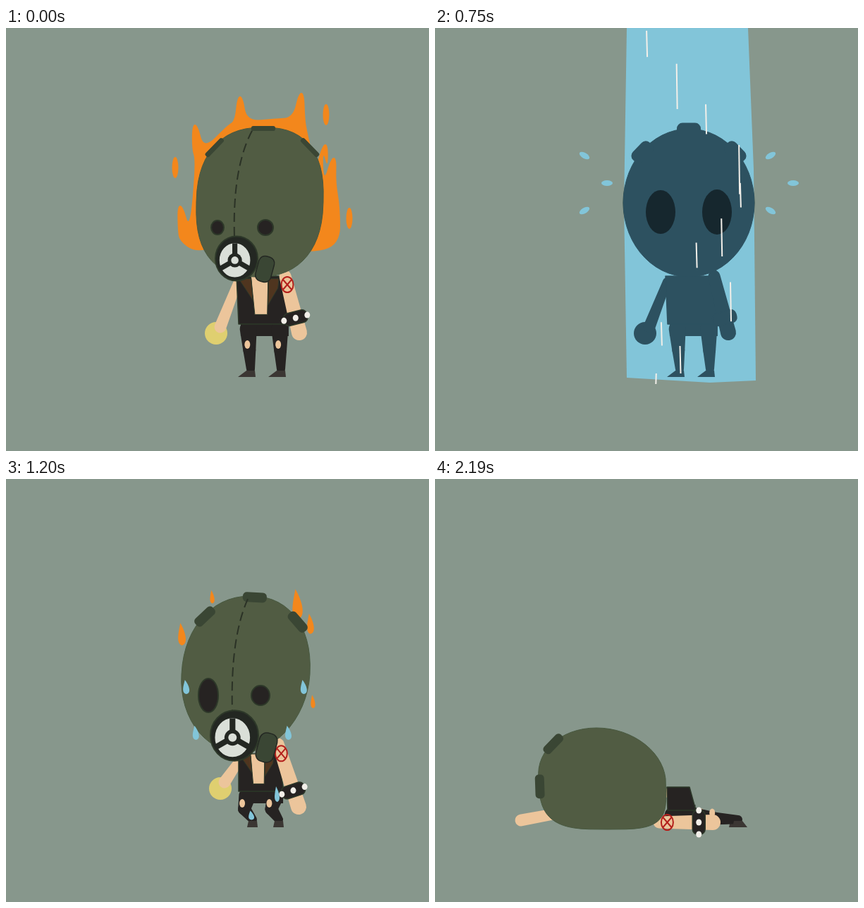
Animation, 600 px wide and 600 px high, one loop 2.52 s. Source, as an HTML page with a canvas:

```html
<!DOCTYPE html>
<html lang="en">
<head>
<meta charset="utf-8">
<title>Hot head</title>
<style>
html, body { margin: 0; width: 100%; height: 100%; overflow: hidden; background: #87978c; }
canvas { display: block; width: 600px; height: 600px; }
</style>
</head>
<body>
<canvas id="stage" width="600" height="600"></canvas>
<script>
const ctx = document.getElementById('stage').getContext('2d');
const LOOP = 2520, TAU = Math.PI * 2, RAD = TAU / 360;
const BG = '#87978c', FIRE = '#f3871c', OLIVE = '#515c43', KNOB = '#3a4634', EDGE = '#2d3829',
  BLACK = '#262322', SKIN = '#ecc59b', BROWN = '#4f351f', BALL = '#dfcf70', PALE = '#dadfd8',
  RED = '#b3201c', WATER = '#82c5d9', SHADE = '#2d5160', DEEP = '#16272e', BOOT = '#3b3633',
  RUBBER = '#232722', WHITE = '#f2efe9';

// head: x, y, rx, ry, lean, roundness above and below, turn, knob height
// mask: x, y, r, seam start; eyes: y, then x, rx, ry for each
// neck, waist: x, y, half width; grip: ball hand; arm: shoulder to hand
// feet: two points, toe, knee bend; mood: ember heat, wetness, drip angle
const stand = {
  head: [360, 247, 90, 106, -5, 0.82, 0.82, 0, 7], mask: [327, 327, 30, 349],
  eyes: [283, 300, 9, 10, 368, 11, 11],
  neck: [361, 352, 34], waist: [366, 420, 36], grip: [304, 424], arm: [396, 352, 416, 432],
  feet: [347, 487, 390, 487, -10, 0], mood: [0, 0, -45]
};
const soak = { ...stand, head: [360, 248, 93, 105, 0, 1, 1, 0, 20], eyes: [261, 320, 21, 31, 400, 21, 32] };
const drench = {
  head: [358, 251, 94, 105, 0, 1, 1, 0, 16], mask: [357, 339, 32, 357],
  eyes: [287, 313, 23, 30, 396, 14, 14],
  neck: [361, 362, 36], waist: [361, 426, 42], grip: [306, 423], arm: [405, 374, 436, 418],
  feet: [346, 486, 391, 486, 0, 0], mood: [1, 1, -45]
};
const slump = {
  head: [340, 277, 91, 111, -7, 0.92, 1, 3, 14], mask: [324, 364, 34, 343],
  eyes: [307, 287, 14, 24, 361, 13, 14],
  neck: [358, 390, 28], waist: [362, 443, 32], grip: [310, 430], arm: [386, 376, 415, 465],
  feet: [350, 486, 387, 486, 0, -8], mood: [0.85, 1, 10]
};
const kneel = {
  head: [323, 302, 91, 104, -6, 0.95, 0.95, -2, 13], mask: [300, 392, 30, 299],
  eyes: [349, 264, 11, 16, 331, 14, 15],
  neck: [361, 412, 27], waist: [368, 470, 30], grip: [310, 464], arm: [372, 411, 371, 488],
  feet: [343, 488, 400, 488, 7, 0], mood: [0.5, 0.6, 49]
};
const faint = {
  head: [237, 425, 90, 72, 8, 1, 0.55, -92, 13], mask: [190, 485, 0, 190],
  eyes: [485, 180, 0, 0, 200, 0, 0],
  neck: [345, 437, 16], waist: [350, 470, 20], grip: [122, 484], arm: [318, 487, 394, 487],
  feet: [425, 486, 430, 486, 6, 0], mood: [0, 0, 60]
};
const keys = [[0, stand], [480, stand], [570, soak], [750, soak], [900, drench], [1110, drench],
  [1200, slump], [1500, kneel], [1650, kneel], [1950, faint], [LOOP, faint]];

const mix = (a, b, k) => a.map((v, i) => v + (b[i] - v) * k);

function poseAt(t) {
  const i = keys.findLastIndex(([from]) => t >= from);
  const [t0, a] = keys[i], [t1, b] = keys[i + 1];
  const k = (t - t0) / (t1 - t0), ease = k * k * (3 - 2 * k);
  const pose = { sway: Math.sin(k * TAU) * 0.3 };
  for (const part in a) pose[part] = mix(a[part], b[part], ease);
  return pose;
}

function randomizer(seed) {
  return () => (seed = seed * 16807 % 2147483647) / 2147483647;
}

function paint(fill, line, width = 1.5) {
  if (fill) { ctx.fillStyle = fill; ctx.fill(); }
  if (line) { ctx.strokeStyle = line; ctx.lineWidth = width; ctx.stroke(); }
}

function shape(points, fill, line, width) {
  ctx.beginPath();
  for (const [x, y] of points) ctx.lineTo(x, y);
  ctx.closePath();
  paint(fill, line, width);
}

// Closed curve through the middles of the sides.
function blob(points, fill) {
  const half = (a, b) => [(a[0] + b[0]) / 2, (a[1] + b[1]) / 2];
  ctx.beginPath();
  ctx.moveTo(...half(points.at(-1), points[0]));
  points.forEach((p, i) => ctx.quadraticCurveTo(...p, ...half(p, points[(i + 1) % points.length])));
  paint(fill);
}

function oval(x, y, rx, ry, fill, line, deg = 0, width) {
  if (rx < 0.3 || ry < 0.3) return;
  ctx.beginPath();
  ctx.ellipse(x, y, rx, ry, deg * RAD, 0, TAU);
  paint(fill, line, width);
}

function box(x, y, deg, w, h, fill, line) {
  if (w < 1 || h < 1) return;
  ctx.save();
  ctx.translate(x, y);
  ctx.rotate(deg * RAD);
  ctx.beginPath();
  ctx.roundRect(-w / 2, -h / 2, w, h, Math.min(w, h) * 0.4);
  paint(fill, line);
  ctx.restore();
}

function leaf(x, y, w, h, color) {
  if (h < 2) return;
  ctx.beginPath();
  ctx.moveTo(x - w * 0.2, y - h / 2);
  ctx.bezierCurveTo(x + w * 0.5, y - h * 0.1, x + w * 0.9, y + h * 0.45, x, y + h / 2);
  ctx.bezierCurveTo(x - w * 0.8, y + h * 0.4, x - w * 0.4, y - h * 0.1, x - w * 0.2, y - h / 2);
  paint(color);
}

function line(x0, y0, x1, y1, color, width) {
  ctx.beginPath();
  ctx.moveTo(x0, y0);
  ctx.lineTo(x1, y1);
  paint(null, color, width);
}

// Tapered, round-ended stroke.
function limb(x0, y0, x1, y1, w0, w1, color) {
  const a = Math.atan2(y1 - y0, x1 - x0) + TAU / 4;
  ctx.beginPath();
  ctx.arc(x0, y0, w0 / 2, a, a + TAU / 2);
  ctx.arc(x1, y1, w1 / 2, a + TAU / 2, a);
  paint(color);
}

// Point on the head outline, or off it when far is not 1.
function rim([cx, cy, rx, ry, lean, above, below], deg, far = 1) {
  const c = Math.cos(deg * RAD), s = Math.sin(deg * RAD), power = s < 0 ? above : below;
  const soft = v => Math.sign(v) * Math.abs(v) ** power;
  return [cx + far * (rx * soft(c) + lean * s), cy + far * ry * soft(s)];
}

function legs(p, c) {
  const [x, y, half] = p.waist, [lx, ly, rx, ry, toe, bend] = p.feet;
  shape([[x - half * 0.92, y - 8], [x + half * 0.97, y - 8], [x + half * 0.97, y + 17], [x - half * 0.92, y + 17]], c(BLACK));
  for (const [side, fx, fy] of [[-1, lx, ly], [1, rx, ry]]) {
    const hx = x + side * half * 0.62, hy = y + 7;
    const kx = (hx + fx) / 2 + bend, ky = (hy + fy) / 2;
    limb(hx, hy, kx, ky, 24, 18, c(BLACK));
    limb(kx, ky, fx, fy - 3, 18, 12, c(BLACK));
    shape([[fx - 8 + Math.min(toe, 0), fy + 8], [fx - 6, fy - 1], [fx + 6, fy - 1], [fx + 7 + Math.max(toe, 0), fy + 8]], c(BOOT));
    if (c(SKIN) === SKIN) oval(kx - 3, ky - 8, 4, 6, SKIN);
  }
}

function vest(p, flat) {
  const [nx, ny, nw] = p.neck, [wx, wy, ww] = p.waist;
  const at = (u, v) => {
    const w = nw + (ww - nw) * v;
    return [nx + (wx - nx) * v + w * (2 * u - 1), ny + (wy - ny) * v];
  };
  shape([at(0, 0), at(1, 0), at(1, 1), at(0, 1)], flat || BLACK, flat || EDGE);
  if (flat || p.mask[2] < 8) return;
  shape([at(0.3, 0), at(0.66, 0), at(0.58, 0.8), at(0.33, 0.8)], SKIN, EDGE, 1);
  shape([at(0.04, 0.05), at(0.3, 0.05), at(0.31, 0.5)], BROWN, EDGE, 1);
  shape([at(0.66, 0.05), at(0.88, 0.05), at(0.84, 0.25), at(0.61, 0.6)], BROWN, EDGE, 1);
}

function reach([x0, y0, x1, y1], flat) {
  const at = k => [x0 + (x1 - x0) * k, y0 + (y1 - y0) * k];
  const turn = Math.atan2(y1 - y0, x1 - x0) / RAD - 90;
  limb(x0, y0, x1, y1, 17, 22, flat || SKIN);
  const [mx, my] = at(0.15), [cx, cy] = at(0.74);
  if (!flat) {
    oval(mx, my, 8.5, 11, null, RED, 0, 2);
    for (const s of [-1, 1]) line(mx - 6, my - 7 * s, mx + 6, my + 7 * s, RED, 2);
  }
  box(cx, cy, turn, 34, 18, flat || BLACK, flat || EDGE);
  if (flat) return;
  for (const s of [-17, 0, 17])
    oval(cx + s * Math.cos(turn * RAD), cy + s * Math.sin(turn * RAD), 4, 4.5, WHITE);
}

function body(p, flat) {
  const c = color => flat || color;
  const [gx, gy] = p.grip, [nx, ny, nw] = p.neck;
  oval(gx - 6 - p.roll, gy + 9, 16, 16, c(BALL));
  limb(nx - nw + 2, ny + 8, gx, gy, 12, 17, c(SKIN));
  legs(p, c);
  vest(p, flat);
  reach(p.arm, flat);
}

function face(p) {
  const [x, y, r, seam] = p.mask, [hx, hy, rx, ry] = p.head;
  if (r < 2) return;
  if (r > 8) {
    const top = hy + 4 - ry * Math.sqrt(1 - ((seam - hx) / rx) ** 2), end = y - r;
    ctx.setLineDash([13, 7]);
    ctx.beginPath();
    ctx.moveTo(seam, top);
    ctx.quadraticCurveTo(x - 6, top + (end - top) * 0.35, x - 3, end);
    paint(null, '#2b3226', 2);
    ctx.setLineDash([]);
  }
  box(x + r * 1.34, y + r * 0.5, 15, r * 0.75, r * 1.22, KNOB, RUBBER);
  oval(x, y, r, r * 1.05, RUBBER, EDGE, 0, 2);
  const dx = x - r * 0.08, dy = y + r * 0.08, d = r * 0.8;
  oval(dx, dy, d * 0.95, d * 1.05, PALE, RUBBER, 0, 2);
  for (const deg of [-90, 30, 150])
    line(dx, dy, dx + Math.cos(deg * RAD) * d, dy + Math.sin(deg * RAD) * d, RUBBER, r * 0.24);
  oval(dx, dy, d * 0.42, d * 0.42, RUBBER);
  oval(dx, dy, d * 0.22, d * 0.22, PALE);
}

function head(p, flat) {
  const outline = Array.from({ length: 60 }, (_, i) => rim(p.head, i * 6));
  shape(outline, flat || OLIVE, flat || '#485940', 1);
  for (const deg of [-136, -90, -44]) {
    const a = deg + p.head[7];
    if (Math.sin(a * RAD) < 0.5) box(...rim(p.head, a, 0.985), a + 90, 34, p.head[8], flat || KNOB);
  }
  const [y, lx, lw, lh, rx, rw, rh] = p.eyes;
  for (const [x, w, h] of [[lx, lw, lh], [rx, rw, rh]])
    oval(x, y, w, h, flat ? DEEP : BLACK, flat ? null : EDGE, 0, 2);
  if (!flat) face(p);
}

const tipsA = [[246, 257], [267, 142], [331, 102], [418, 97], [452, 170], [464, 189]];
const tipsB = [[243, 233], [257, 163], [318, 105], [414, 99], [455, 138], [477, 233]];

function blaze(t, p) {
  const k = (1 - Math.cos(Math.PI * t / 420)) / 2;
  const tips = tipsA.map((tip, i) => {
    const [x, y] = mix(tip, tipsB[i], k);
    return [x, y + 8 * Math.sin(Math.PI * t / 210) * Math.cos(i * 2)];
  });
  const [cx, cy] = p.head;
  const fire = [[300, 310], [268, 318], [246, 302]];
  tips.forEach(([x, y], i) => {
    const inner = x + (cx - x) * 0.05;
    fire.push([inner - 8, y + 30], [x - 3, y - 5], [x + 5, y - 5], [inner + 9, y + 30]);
    if (i === tips.length - 1) return;
    const [nx, ny] = tips[i + 1];
    fire.push(rim(p.head, Math.atan2((y + ny) / 2 - cy, (x + nx) / 2 - cx) / RAD, 1.12));
  });
  fire.push([474, 255], [474, 308], [430, 320]);
  blob(fire, FIRE);
  const life = (t % 420) / 420;
  for (const [x, y] of [[454, 123], [240, 198], [487, 270]])
    oval(x - 16 * life * Math.sign(x - cx), y - 60 * life, 4.5 - 2.5 * life, 15 - 10 * life, FIRE);
}

function embers(p) {
  const heat = p.mood[0];
  [-120, -155, -51, -33, 18].forEach((deg, i) => {
    const [x, y] = rim(p.head, deg, 1 + 0.18 * heat * heat);
    const h = heat * (36 + 14 * Math.sin(i * 1.6 - 1.5)) * (1 + p.sway * (-1) ** i);
    leaf(x, y, h * 0.34, h, FIRE);
  });
}

function drips(p) {
  const [, wet, slide] = p.mood;
  for (const side of [-1, 1]) for (const lag of [0, 36]) {
    const a = slide + lag;
    const [x, y] = rim(p.head, side > 0 ? a : 180 - a, 0.9 + a * 0.003);
    const streak = side > 0 && lag ? Math.max(0, -slide) * 1.3 : 0;
    leaf(x, y, wet * 9, wet * (20 + streak), WATER);
  }
  const [x, y, half] = p.waist;
  leaf(x + half * 0.7, y + slide * 0.4, 7, wet * 22, WATER);
  leaf(p.feet[0] - 2, p.feet[1] - 9, 8, wet * 13, WATER);
}

function pour(t, p) {
  const top = Math.max(0, (t - 810) / 90) * 505;
  const low = Math.min(1, (t - 480) / 60) * 505;
  ctx.save();
  ctx.beginPath();
  ctx.rect(0, top, 600, low - top);
  ctx.clip();
  shape([[272, 0], [444, 0], [452, 200], [455, 500], [390, 503], [272, 496], [268, 250]], WATER);
  body(p, SHADE);
  head(p, SHADE);
  const rand = randomizer(77);
  for (let i = 0; i < 11; i++) {
    const x = 300 + rand() * 135, y = (i * 50 + rand() * 30 + (t - 750) * 1.4 + 1120) % 560;
    line(x, y, x + 1, Math.min(490, y + 30 + rand() * 40), WHITE, 2);
  }
  ctx.restore();
  if (t < 540 || t >= 870) return;
  const far = 0.76 + 0.32 * ((t - 540) % 120) / 120;
  for (const side of [-1, 1]) for (let i = 0; i < 3; i++) {
    const x = side * 132 - 16 * (-1) ** i;
    oval(360 + x * far, 230 + (i * 39 - 49) * far, 8, 4, WATER, null, side * (i - 1) * 30);
  }
}

// The drawing is held for a moment at every pose.
function hold(t) {
  const snap = (from, step) => from + Math.floor((t - from) / step) * step;
  if (t < 480) return snap(0, 60);
  if (t < 1260) return snap(480, 30);
  if (t < 1680) return snap(1260, 60);
  return t < 2190 ? snap(1680, 90) : 2190;
}

function draw(t) {
  const p = poseAt(t);
  p.roll = Math.max(0, t - 1710) * 0.7;
  if (p.roll) p.roll += p.grip[0] - kneel.grip[0];
  ctx.fillStyle = BG;
  ctx.fillRect(0, 0, 600, 600);
  if (t < 540) blaze(t, p);
  embers(p);
  body(p);
  head(p);
  drips(p);
  if (t > 480 && t < 900) pour(t, p);
}

ctx.lineJoin = 'round';
const start = performance.now();
function tick() {
  draw(hold((performance.now() - start) % LOOP));
  requestAnimationFrame(tick);
}
tick();
</script>
</body>
</html>
```
